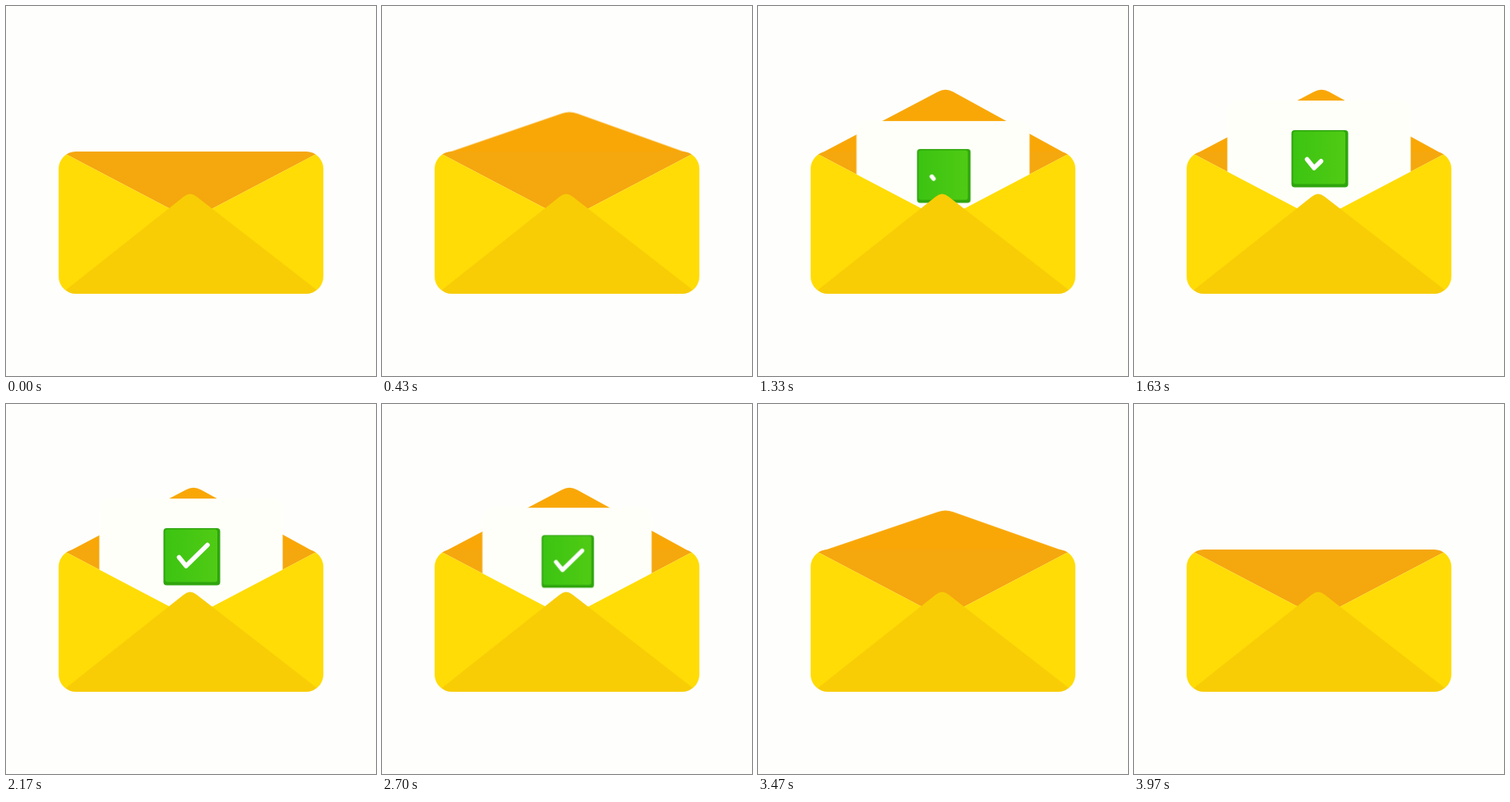
Recreate the animation shown at these times as an HTML page. Size 450 px wide and 450 px high, loop 4010 ms.

```html
<!DOCTYPE html>
<html lang="en">
<head>
<meta charset="utf-8">
<title>Envelope</title>
<style>
  html, body { margin: 0; width: 100%; height: 100%; overflow: hidden; background: #fefefc; }
  svg { display: block; width: 100vw; height: 100vh; }

  .flap, .paper, .tick { animation: 4010ms linear infinite; }
  .flap { fill: #f9a707; transform-origin: 228px 180px; animation-name: flap; }
  .paper { transform-origin: 225px 260px; animation-name: paper; }
  .tick {
    fill: none; stroke: #fff; stroke-width: 5.5;
    stroke-linecap: round; stroke-linejoin: round;
    stroke-dasharray: 100 110; animation-name: tick;
  }

  @keyframes flap {
    0%, 1% { transform: scaleY(0); }
    15.96%, 81.25% { transform: scaleY(1); }
    96.2%, 100% { transform: scaleY(0); }
  }
  /* Rises out of the pocket, later shrinks back into it. */
  @keyframes paper {
    0%, 21.45% { transform: translateY(89px) scale(.7); }
    35.91%, 66.2% { transform: translateY(0) scale(1); }
    81.17%, 100% { transform: translateY(0) scale(0); }
  }
  @keyframes tick {
    0%, 31.42% { stroke-dashoffset: 103; }
    49.13%, 100% { stroke-dashoffset: 0; }
  }
</style>
</head>
<body>
<svg viewBox="0 0 450 450">
  <defs>
    <clipPath id="body"><rect x="64" y="177" width="322" height="173" rx="21"/></clipPath>
    <linearGradient id="green" x1="0" y1="0" x2="1" y2="0">
      <stop offset="0" stop-color="#3cc412"/>
      <stop offset="1" stop-color="#50cb14"/>
    </linearGradient>
  </defs>

  <path class="flap" d="M73 181 L218.5 104.5 Q228 99 237.5 104.5 L377 181 Z"/>
  <path clip-path="url(#body)" fill="#f5a70e" d="M64 175.5 H386 L225 260 Z"/>

  <g class="paper">
    <rect x="113.5" y="115" width="223" height="147" rx="15" fill="#fffffa"/>
    <rect x="191.5" y="151" width="69" height="69.5" rx="4" fill="#2fa50e"/>
    <rect x="193.5" y="152.5" width="63.5" height="64" rx="3" fill="url(#green)"/>
    <path class="tick" pathLength="100" d="M210.5 186.5 L219 197 L245 171.5"/>
  </g>

  <g clip-path="url(#body)">
    <path fill="#ffdc05" d="M64 175.5 L225 260 L386 175.5 V350 H64 Z"/>
    <path fill="#f8cd06" d="M67 350 L216 232 Q224 225 232 232 L384 350 Z"/>
  </g>
</svg>
</body>
</html>
```
